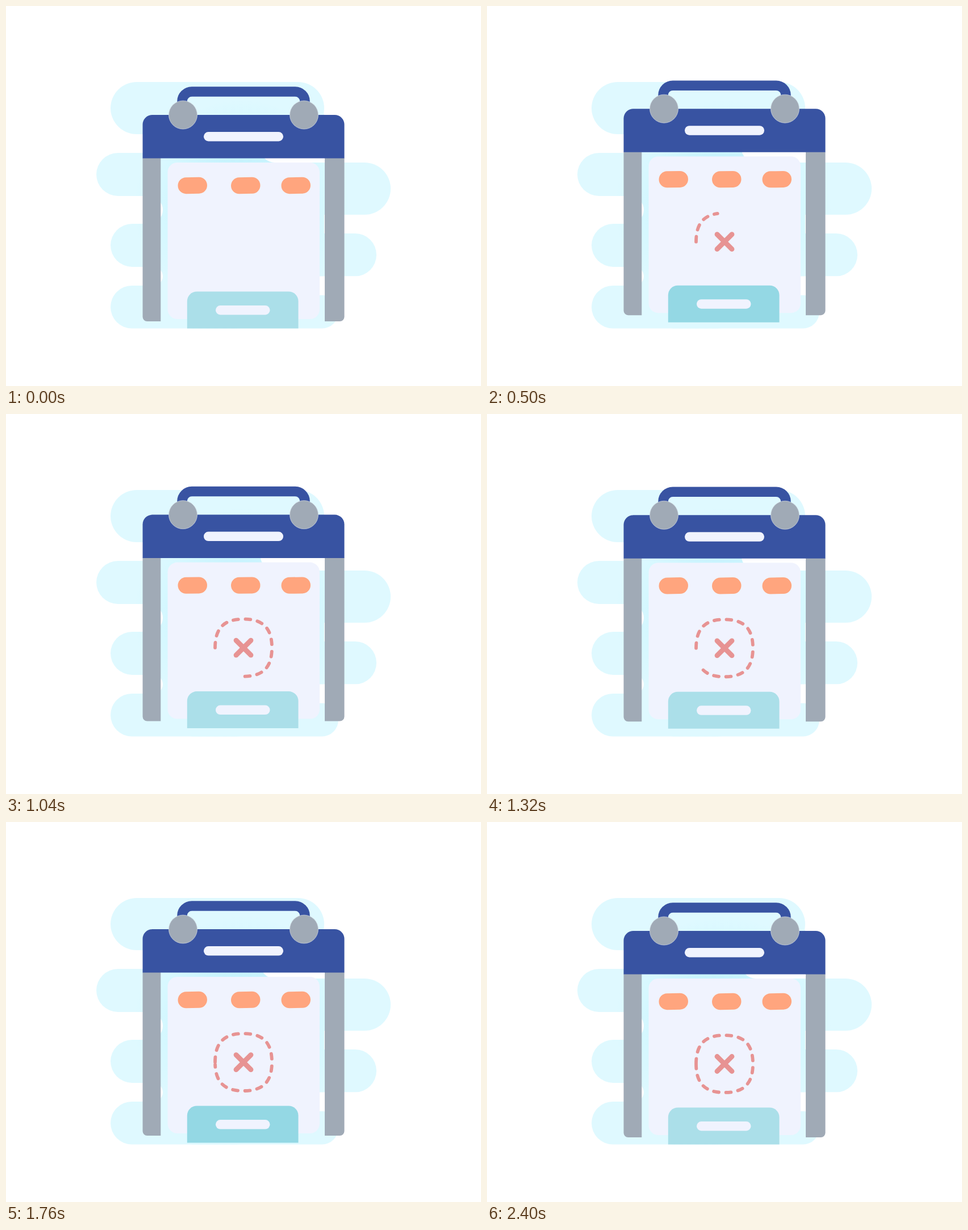
Write an HTML page that moves like this. It is 836x670 px and loops after 2420 ms.

```html
<!DOCTYPE html>
<html lang="en">
<head>
<meta charset="utf-8">
<title>Clipboard</title>
<style>
  html, body { margin: 0; width: 100%; height: 100%; overflow: hidden; background: #fff; }
  svg { display: block; width: 100%; height: 100%; }
</style>
</head>
<body>
<svg viewBox="0 0 836 670">
  <defs>
    <radialGradient id="glow" gradientUnits="userSpaceOnUse" cx="415" cy="355" r="190">
      <stop offset="0" stop-color="#b4effb"/>
      <stop offset=".5" stop-color="#caf4fe"/>
      <stop offset=".75" stop-color="#d6f8ff"/>
      <stop offset="1" stop-color="#dff9ff"/>
    </radialGradient>
  </defs>

  <g fill="url(#glow)">
    <rect x="184" y="134" width="376" height="92" rx="46"/>
    <rect x="159" y="259" width="300" height="76" rx="38"/>
    <rect x="400" y="276" width="277" height="92" rx="46"/>
    <rect x="184" y="384" width="300" height="76" rx="38"/>
    <rect x="400" y="401" width="252" height="75.500" rx="37.700"/>
    <rect x="184" y="493" width="260" height="75.500" rx="37.700"/>
    <rect x="300" y="510" width="285" height="58.500" rx="29"/>
    <rect x="250" y="190" width="310" height="350"/>
  </g>
  <g fill="#fff">
    <rect x="448" y="226" width="252" height="50" rx="25"/>
    <rect x="500" y="476.500" width="200" height="33.500" rx="16.700"/>
    <rect x="120" y="335" width="156" height="49" rx="24.500"/>
    <rect x="120" y="460" width="156" height="33" rx="16.500"/>
  </g>

  <g id="board">
    <path fill="#a0aab6" d="M240.500 268H272.300V556H248.500a8 8 0 0 1-8-8ZM561 268H595.500V548a8 8 0 0 1-8 8H561Z"/>
    <rect x="284.500" y="276" width="267.500" height="276" rx="17" fill="#f0f3fe"/>
    <path fill="#3853a2" d="M240.500 268.500V209a17 17 0 0 1 17-17H578.500a17 17 0 0 1 17 17V268.500Z"/>
    <path fill="none" stroke="#3853a2" stroke-width="17.500" d="M310 185V168a17 17 0 0 1 17-17H509a17 17 0 0 1 17 17V185"/>
    <g fill="#a0aab6" stroke="#d3dae4" stroke-width=".7">
      <circle cx="311.500" cy="192" r="25"/>
      <circle cx="524.500" cy="192" r="25"/>
    </g>
    <g fill="#ffa57e">
      <rect x="302.500" y="302" width="51.500" height="29" rx="14.500" transform="rotate(-1 328 316.500)"/>
      <rect x="396" y="302" width="51.500" height="29" rx="14.500" transform="rotate(-1 422 316.500)"/>
      <rect x="484.500" y="302" width="51.500" height="29" rx="14.500" transform="rotate(-1 510 316.500)"/>
    </g>
    <path id="pocket" d="M318.800 568.500V520.500a17 17 0 0 1 17-17H497.500a17 17 0 0 1 17 17V568.500Z"/>
    <g fill="#f0f3fe">
      <rect x="348" y="222" width="140" height="16.500" rx="8.200"/>
      <rect x="369" y="528" width="95.500" height="16.500" rx="8.200"/>
    </g>
    <g fill="none" stroke="#e79393" stroke-linecap="round">
      <path id="ring" stroke-width="5.800" d="M368 426.500C368 392 383.500 376 418 376S468 392 468 426.500S452.500 477 418 477S368 461 368 426.500"/>
      <path class="cross" stroke-width="8.800" pathLength="1" d="M405 413.500L431 439.500"/>
      <path class="cross" stroke-width="8.800" pathLength="1" d="M431 413.500L405 439.500"/>
    </g>
  </g>
</svg>
<script>
const LOOP = 2420, HALF = LOOP / 2, LIFT = 14.5;
const DASH = 9, GAP = 12.3;
const [board, pocket, ring] = ['board', 'pocket', 'ring'].map(id => document.getElementById(id));
const cross = document.querySelectorAll('.cross');
const ringLength = ring.getTotalLength();
const clamp = v => Math.min(1, Math.max(0, v));

function bezier(x1, y1, x2, y2) {
  const at = (a, b, s) => 3 * a * s * (1 - s) ** 2 + 3 * b * s * s * (1 - s) + s ** 3;
  return x => {
    if (x <= 0 || x >= 1) return clamp(x);
    let lo = 0, hi = 1;
    for (let i = 0; i < 24; i++) {
      const mid = (lo + hi) / 2;
      if (at(x1, x2, mid) < x) lo = mid; else hi = mid;
    }
    return at(y1, y2, lo);
  };
}
const floatEase = bezier(.33, .08, .12, 1);
const drawEase = bezier(.25, .1, .25, 1);

function reveal(path, dashes, visible) {
  path.style.visibility = visible ? 'visible' : 'hidden';
  path.setAttribute('stroke-dasharray', dashes.join(' '));
}

function drawRing(progress) {
  const dashes = [];
  for (let left = ringLength * progress; left > 0; left -= DASH + GAP)
    dashes.push(Math.min(DASH, left), GAP);
  if (dashes.length) dashes[dashes.length - 1] = 999;
  reveal(ring, dashes, progress > 0);
}

function render(t) {
  const up = t < HALF ? floatEase(t / HALF) : 1 - floatEase((t - HALF) / HALF);
  board.setAttribute('transform', `translate(0 ${-LIFT * up})`);
  const deep = (t >= 350 && t < 660) || (t >= 1540 && t < 2250);
  pocket.setAttribute('fill', deep ? '#94d8e4' : '#abdfe9');
  drawRing(drawEase((t - 200) / 1850));
  cross.forEach((line, i) => {
    const p = clamp((t - 20 - i * 100) / 120);
    reveal(line, [p, 2], p > 0);
  });
}

const start = performance.now();
function tick() {
  render((performance.now() - start) % LOOP);
  requestAnimationFrame(tick);
}
tick();
</script>
</body>
</html>
```
